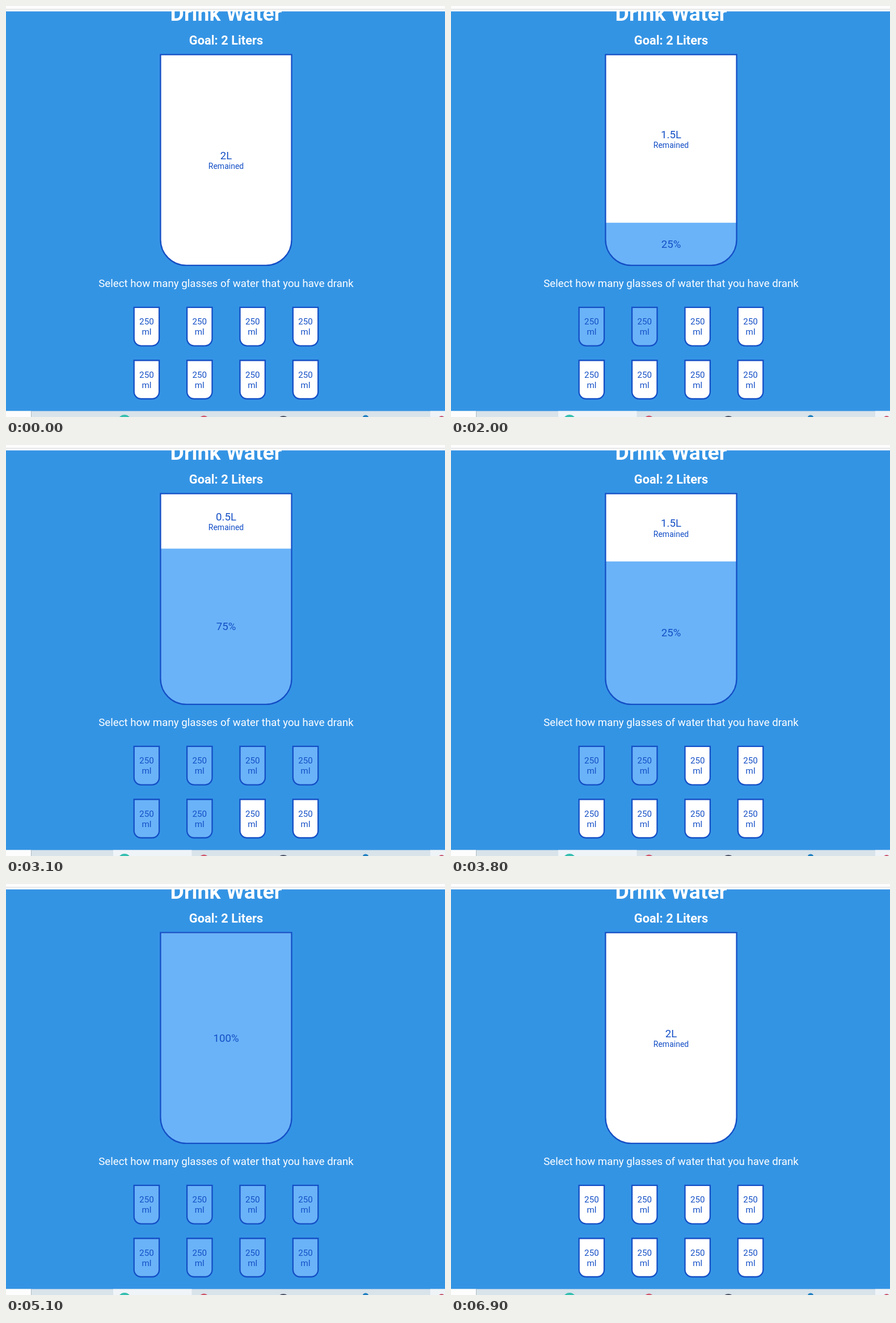
Write an HTML page that moves like this. It is 774x724 px and loops after 7.9 s.

```html
<!DOCTYPE html>
<html lang="en">
<head>
<meta charset="utf-8">
<title>Drink Water</title>
<style>
  html, body { margin: 0; width: 100%; height: 100%; overflow: hidden; background: #3494e4; }
  svg { display: block; width: 774px; height: 724px; }
  text { font-family: Roboto, sans-serif; font-size: 18.7px; text-anchor: middle; fill: #144fc6; }
  .light { fill: #fff; }
  .bold { font-weight: 700; }
  .outline { stroke: #144fc6; stroke-width: 2.33; }
  #note { font-size: 14px; }
  .dose { font-size: 15.2px; }
</style>
</head>
<body>
<svg id="stage" viewBox="0 0 774 724">
  <rect width="774" height="724" fill="#3494e4"/>
  <text class="light bold" x="388" y="26" style="font-size:37.4px">Drink Water</text>
  <rect width="774" height="9.5" fill="#fdfdfd"/>
  <rect y="5" width="774" height="1.5" fill="#e2e2e2"/>
  <text class="light bold" x="388" y="67.6" style="font-size:21.85px">Goal: 2 Liters</text>

  <clipPath id="inside"><path id="clipShape"/></clipPath>
  <path id="cupFill" fill="#fff"/>
  <g clip-path="url(#inside)">
    <rect id="water" x="271" width="234" fill="#6ab3f8"/>
    <g id="remained">
      <text id="liters" x="388" y="-1.6"></text>
      <text id="note" x="388" y="15.8">Remained</text>
    </g>
    <text id="percent" x="388"></text>
  </g>
  <path id="cupLine" class="outline" fill="none"/>

  <text class="light" x="388" y="495.3">Select how many glasses of water that you have drank</text>
  <g id="glasses"></g>

  <g id="taskbar">
    <rect y="713.5" width="774" height="11" fill="#d8e3ea"/>
    <rect y="713.5" width="44" height="11" fill="#fdfdfd"/>
    <rect x="44" y="713.5" width="1" height="11" fill="#aebac2"/>
    <rect x="748" y="713.5" width="26" height="11" fill="#eef3f7"/>
    <rect id="hover" x="189" y="713.5" width="138.5" height="11" fill="#eff4f8"/>
    <circle cx="209" cy="731.5" r="11.5" fill="#35bfb0"/>
    <circle cx="349" cy="730.5" r="9" fill="#d0546a"/>
    <circle cx="489" cy="733.5" r="11.5" fill="#4a4f63"/>
    <circle cx="634" cy="726" r="5.5" fill="#1f7fc0"/>
    <circle cx="768" cy="728" r="6" fill="#c8506a"/>
  </g>
</svg>
<script>
const LOOP = 7900, STEP = 100, EASE_TIME = 400;
const TOP = 86.8, BOTTOM = 455.8, PITCH = 93.4;

// Each click: time in ms and number of full glasses afterwards
const CLICKS = [
  [936, 1], [1860, 2], [2771, 6], [3749, 2], [4692, 8], [5560, 1], [6460, 0]
];

const $ = id => document.getElementById(id);
const SVG = 'http://www.w3.org/2000/svg';

function add(parent, tag, attrs, label = '') {
  const node = document.createElementNS(SVG, tag);
  for (const key in attrs) node.setAttribute(key, attrs[key]);
  node.textContent = label;
  return parent.appendChild(node);
}

function cupPath(x, y, w, h, r) {
  return `M${x} ${y}h${w}v${h - r}a${r} ${r} 0 0 1 ${-r} ${r}` +
    `h${2 * r - w}a${r} ${r} 0 0 1 ${-r} ${-r}z`;
}

// cubic-bezier(.25, .1, .25, 1)
function ease(x) {
  if (x <= 0 || x >= 1) return Math.min(1, Math.max(0, x));
  const curve = (a, b, s) => 3 * a * s * (1 - s) ** 2 + 3 * b * s * s * (1 - s) + s ** 3;
  let low = 0, high = 1;
  for (let i = 0; i < 24; i++) {
    const mid = (low + high) / 2;
    if (curve(.25, .25, mid) < x) low = mid; else high = mid;
  }
  return curve(.1, 1, low);
}

const bigCup = cupPath(272.4, 85.65, 231.2, 371.3, 45.5);
for (const id of ['clipShape', 'cupFill', 'cupLine']) $(id).setAttribute('d', bigCup);

const glasses = Array.from({ length: 8 }, (_, i) => {
  const x = 388 + (i % 4 - 1.5) * PITCH, y = 529.7 + Math.floor(i / 4) * PITCH;
  const glass = add($('glasses'), 'path',
    { class: 'outline', d: cupPath(x - 22.2, y + 1.17, 44.4, 67.7, 12.5) });
  add($('glasses'), 'text', { class: 'dose', x, y: y + 31.6 }, '250');
  add($('glasses'), 'text', { class: 'dose', x, y: y + 49.5 }, 'ml');
  return glass;
});

function render(now) {
  const t = Math.floor(now % LOOP / STEP) * STEP;
  let count = 0, before = 0, start = -EASE_TIME, liters = '2L', percent = '';
  for (const [time, full] of CLICKS) {
    if (time > t) break;
    [before, count, start] = [count, full, time];
    if (full < 8) liters = 2 - full / 4 + 'L';
    if (full > 0) percent = full * 12.5 + '%';
  }
  const progress = ease((t - start) / EASE_TIME);
  const done = progress === 1;
  const height = (before + (count - before) * progress) / 8 * (BOTTOM - TOP);
  const surface = BOTTOM - height;

  $('water').setAttribute('y', surface);
  $('water').setAttribute('height', height ? height + 4 : 0);
  $('liters').textContent = liters;
  $('remained').setAttribute('transform', `translate(0 ${(TOP + surface) / 2})`);
  $('remained').setAttribute('visibility', done && count === 8 ? 'hidden' : 'visible');
  $('percent').textContent = percent;
  $('percent').setAttribute('y', (surface + BOTTOM) / 2 + 6.9);
  $('percent').setAttribute('visibility', done && count === 0 ? 'hidden' : 'visible');
  glasses.forEach((glass, i) => glass.setAttribute('fill', i < count ? '#6ab3f8' : '#fff'));
  $('hover').setAttribute('opacity', t < 900 ? 0 : Math.min(1, Math.max(0, (6900 - t) / 400)));
}

const origin = performance.now();
function tick() {
  render(performance.now() - origin);
  requestAnimationFrame(tick);
}
tick();
</script>
</body>
</html>
```
